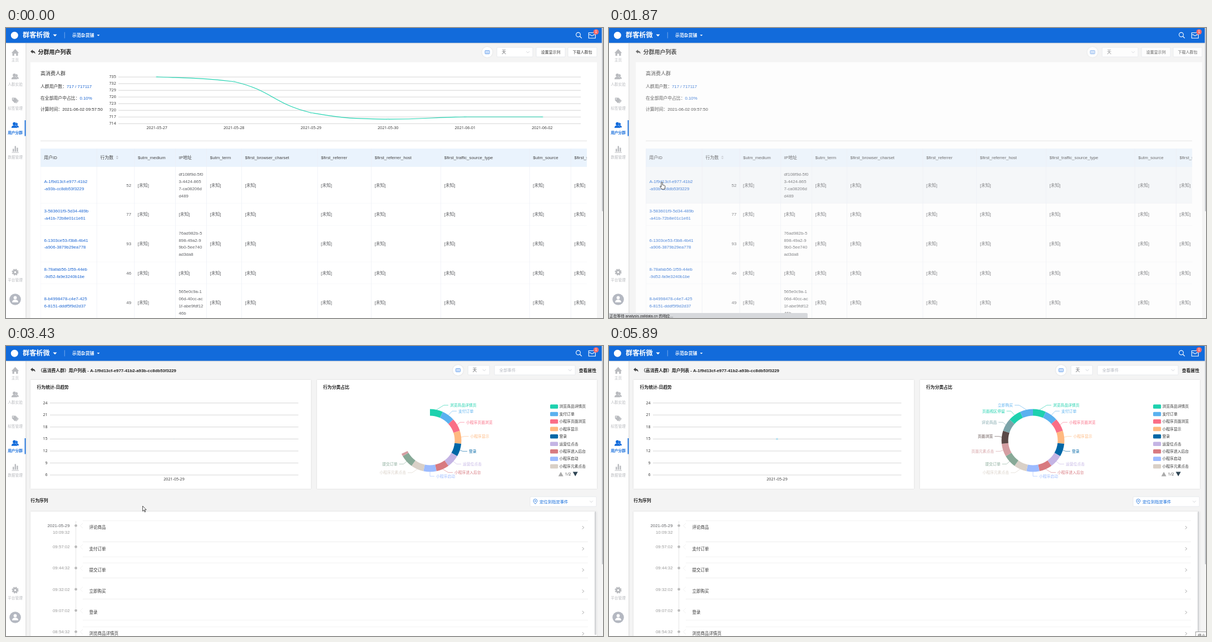
These frames come from a looping animation (1073x522 px, 5920 ms). An HTML page:

```html
<!DOCTYPE html>
<html lang="zh-CN">
<head>
<meta charset="utf-8">
<style>
html, body { margin: 0; width: 100%; height: 100%; overflow: hidden; background: #f4f4f4; }
svg { display: block; width: 100vw; height: 100vh; font-family: 'Liberation Sans', 'Noto Sans CJK SC', sans-serif; }
.axis { font-family: 'Open Sans', 'Noto Sans', sans-serif; }
.card { filter: drop-shadow(0 .8px .8px #0002); }
</style>
</head>
<body>
<script>
const LOOP = 5920, BLUE = '#126bdb', LINK = '#1c66d2', DARK = '#333', CELL = '#606266', GRAY = '#b9bbbf', EDGE = '#ebeef5';
const range = (n, f) => Array.from({ length: n }, (_, i) => f(i)).join('');

// y is the vertical middle of the text
const text = (x, y, s, str, fill = DARK, attrs = '') =>
  `<text x="${x}" y="${y + s * .36}" font-size="${s}" fill="${fill}" ${attrs}>${str}</text>`;
const rect = (x, y, w, h, fill, attrs = '') =>
  `<rect x="${x}" y="${y}" width="${w}" height="${h}" fill="${fill}" ${attrs}/>`;
const circle = (x, y, r, fill, attrs = '') => `<circle cx="${x}" cy="${y}" r="${r}" fill="${fill}" ${attrs}/>`;
const shape = (d, fill, attrs = '') => `<path d="${d}" fill="${fill}" ${attrs}/>`;
const line = (d, color, w = .6, attrs = '') => shape(d, 'none', `stroke="${color}" stroke-width="${w}" ${attrs}`);
const group = (id, body, attrs = '') => `<g id="${id}" ${attrs}>${body}</g>`;
const BOLD = 'font-weight="700"', MID = 'text-anchor="middle"', END = 'text-anchor="end"', AXIS = 'class="axis"';

const chevron = (x, y) => line(`M${x - 2.8} ${y - 1.3}l2.8 2.8 2.8-2.8`, '#b4b8c0');
const box = (x, y, w, h) => rect(x, y, w, h, '#fff', 'rx="1.5" stroke="#dcdfe6" stroke-width=".6"');
const back = shape('M44 42.3l4-3.4v2q4.6.3 4.6 5.6-1.5-2.7-4.6-2.6v2z', '#444');
const keyButton = x => circle(x, 43.5, 9.5, '#fff', 'class="card"') +
  rect(x - 4, 40.5, 8, 6, '#e3efff', 'rx=".8" stroke="#4c8fe6" stroke-width=".8"') +
  line(`M${x - 2.5} 42.7h5M${x - 2.5} 44.7h5`, '#4c8fe6', .7, 'stroke-dasharray="1 .8"');

// ---------- frame around the pages ----------
const users = (y, c) => shape(`M18 ${y - 4.5}a2.5 2.5 0 0 1 2 4.5q3 1 3 4h-3q0-3-3-4.3 2-2 1-4.2z`, c) +
  circle(15, y - 2.6, 2.9, c) + shape(`M9.8 ${y + 4.8}q0-4.6 5.2-4.6t5.2 4.6z`, c);
const caption = (y, s, on) => text(16.5, y, 6.7, s, on ? BLUE : GRAY, MID + (on ? ' ' + BOLD : ''));

const sidebar = rect(0, 27, 35.3, 495, '#fff', 'style="filter:drop-shadow(.8px 0 1px #0004)"') +
  shape('M9.8 45l6.7-7.2 6.7 7.2h-1.7v5h-3.3v-3.8h-3.4v3.8h-3.3v-5z', GRAY) + caption(57.5, '主页') +
  users(87.5, GRAY) + caption(101.5, '人群实验') +
  shape('M10.8 125.5h5l5 5.2-4.6 4.8-5.4-5.2zM17.2 125.5l5.6 5.4-4.2 4.8-1-.9 3.5-4-5.2-5.3z', GRAY) +
  circle(13, 127.7, .9, '#fff') + caption(145, '标签管理') +
  users(175, BLUE) + caption(189, '用户分群', true) + rect(33.6, 166, 1.8, 28.5, BLUE) +
  shape('M12 217.5h2.4v5H12zM15.6 212.5H18v10h-2.4zM19.2 215.5h2.4v7h-2.4zM10.5 223.5h12.5v1H10.5z', GRAY) + caption(233, '数据管理') +
  circle(16.5, 439.5, 3.3, 'none', `stroke="${GRAY}" stroke-width="3"`) +
  circle(16.5, 439.5, 5.2, 'none', `stroke="${GRAY}" stroke-width="1.8" stroke-dasharray="2.4 1.68"`) + caption(453.5, '平台管理') +
  circle(16.5, 488.5, 10.3, '#b4b8c1') + circle(16.5, 485.5, 2.9, '#fff') + shape('M11 493.8q0-4.8 5.5-4.8t5.5 4.8z', '#fff');

const header = rect(0, 0, 1073, 26.7, BLUE, 'style="filter:drop-shadow(0 .8px 1px #0004)"') +
  circle(15.3, 13.2, 6.5, '#fff') +
  text(30, 13, 12.2, '群客析微', '#fff', 'font-weight="900"') +
  shape('M84.5 11.5h7l-3.5 3.8z', '#fff') + line('M105.3 7.5v11', '#fff9', .7) +
  text(119, 13, 7.9, '示范杂货铺', '#fff', BOLD) + shape('M163.6 12h4.8l-2.4 2.6z', '#fff') +
  circle(1028.5, 12, 3.9, 'none', 'stroke="#fff" stroke-width="1.1"') + line('M1031.4 15l3.4 3.4', '#fff', 1.3) +
  line('M1047.3 8.5h12v9.7h-12zM1047.3 12h3.4q.5 2 2.6 2t2.6-2h3.4', '#fff', 1.1) +
  circle(1060.5, 7, 4.8, '#f56c6c') + text(1060.5, 7, 6.5, '1', '#fff', MID);

// ---------- page 1: user list ----------
const trend = [88, 96.5, 152.5, 164.2, 160, 160].map((y, i) => [271.2 + 138.5 * i, y]);
function smooth(p) {
  const at = i => p[Math.max(0, Math.min(p.length - 1, i))];
  const clamp = (v, a, b) => Math.max(Math.min(a, b), Math.min(Math.max(a, b), v));
  const handle = (i, dir) => {
    const v = [0, 1].map(k => at(i)[k] + dir * (at(i + 1)[k] - at(i - 1)[k]) / 4);
    return [v[0], clamp(v[1], at(i)[1], at(i + dir)[1])];
  };
  return 'M' + p[0] + range(p.length - 1, i => `C${handle(i, 1)} ${handle(i + 1, -1)} ${p[i + 1]}`);
}
const days = ['2021-05-27', '2021-05-28', '2021-05-29', '2021-05-30', '2021-06-01', '2021-06-02'];
const trendChart =
  range(8, i => line(`M202 ${88.2 + 12 * i}h831`, '#c9c9c9', .8) + text(197.8, 87.5 + 12 * i, 7.2, 735 - 3 * i, DARK, `${AXIS} ${END}`)) +
  days.map((d, i) => text(trend[i][0], 179.7, 7.2, d, DARK, `${AXIS} ${MID}`)).join('') +
  line(smooth(trend), '#22d3b1', 1.2) + trend.map(p => circle(...p, 1.1, '#fff', 'stroke="#22d3b1" stroke-width=".6"')).join('');

const cols = [62, 163.3, 230.8, 304.5, 360.5, 423.5, 560, 656.5, 781.5, 941, 1015.3];
const heads = ['用户ID', '行为数', '$utm_medium', 'IP地址', '$utm_term', '$first_browser_charset', '$first_referrer',
  '$first_referrer_host', '$first_traffic_source_type', '$utm_source', '$first_search'];
const unknown = ['[未知]'];
const rows = [
  [250, 66, 'A-1f9d13cf-e977-41b2 -a93b-cc8db53f3229', 52, 'df108f9d-5f0 3-4424-865 7-ca08206d d489'],
  [316, 39.6, '3-583601f9-5d34-489b -a41b-72b8e01c1e61', 77],
  [355.6, 65.7, '6-1303ce53-f3b8-4b41 -a906-3879b29ea778', 93, '76ad982b-5 898-49a2-9 9b0-5ee740 ad3da8'],
  [421.3, 39.7, '8-78afab56-1f59-44eb -9d52-fa9e3240b1be', 46],
  [461, 66, '8-b4998478-c4e7-425 6-8151-dddf5f9d2d37', 49, '565e0c9a-1 06d-40cc-ac 1f-abe9fdf12 46b']
];
const lines = (x, y, list, fill) =>
  list.map((s, i) => text(x, y + (i - (list.length - 1) / 2) * 12.9, 7.83, s, fill)).join('');
const row = ([y, h, id, n, ip], r) => {
  const m = y + h / 2 - .3;
  return rect(62, y, 982, h, '#fff', `id="row${r}"`) + lines(68.5, m, id.split(' '), LINK) +
    text(225, m, 7.83, n, CELL, END) +
    cols.slice(2).map((x, i) => lines(x + 6, m, i == 1 && ip ? ip.split(' ') : unknown, CELL)).join('') +
    line(`M62 ${y + h}h982`, EDGE, .7);
};
const table = rect(62, 217, 982, 33, '#eaf3fd') + rows.map(row).join('') +
  cols.map((x, i) => text(x + 6.3, 233, 7.83, heads[i], '#444') + line(`M${x} 217v305`, EDGE, .7)).join('') +
  shape('M197.5 232.2l2.3-2.4 2.3 2.4zM197.5 233.8l2.3 2.4 2.3-2.4z', '#c0c4cc');

const button = (x, s) => box(x, 35, 52, 17) + text(x + 26, 43.6, 7, s, DARK, MID);
const page1 = back + text(57.5, 43, 10, '分群用户列表', '#222', BOLD) +
  keyButton(865) + box(882.3, 35, 64.5, 17) + text(891, 43.5, 7.83, '天', CELL) + chevron(938, 43.3) +
  button(953, '设置显示列') + button(1010, '下载人群包') +
  rect(44, 61.5, 1018, 470, '#fff') + text(62, 81.5, 9, '高消费人群', DARK, 'font-weight="500"') +
  text(62, 105.5, 7.83, `人群用户数：<tspan fill="${LINK}">717 / 717117</tspan>`) +
  text(62, 126, 7.83, `在全部用户中占比：<tspan fill="${LINK}">0.10%</tspan>`) +
  text(62, 146, 7.83, '计算时间：2021-06-02 09:57:50') +
  group('trend', trendChart) + line('M62 203.2h982', '#ddd', .9) + group('table', table, 'clip-path="url(#tableClip)"');

// ---------- page 2: one user ----------
const TURN = Math.PI * 2;
// name, colour, label x, label y, in order around the ring
const parts = [
  ['浏览商品详情页', '#1dd1ae', 798, 106.5], ['支付订单', '#5ab1ef', 813, 117.2], ['小程序页面浏览', '#fa6e86', 827, 137.3],
  ['小程序显示', '#ffb980', 834.5, 162.7], ['登录', '#0067a6', 832, 189.5], ['运营位点击', '#c4b4e4', 821, 212.5],
  ['小程序进入后台', '#d87a80', 806, 227.7], ['小程序启动', '#9cbbff', 773, 234.4], ['小程序元素点击', '#d9d0c7', 719, 228],
  ['提交订单', '#87a997', 703.5, 212.5], ['页面元素点击', '#d49ea2', 692, 189.5], ['页面浏览', '#5b4947', 690, 162.7],
  ['评论商品', '#7ba3a8', 697, 137.3], ['页面视区停留', '#1dd1ae', 711.5, 117.2], ['立即购买', '#5ab1ef', 726, 106.5]
];
const STEP = TURN / parts.length;
const ring = (a, r) => [762 + r * Math.sin(a), 170 - r * Math.cos(a)];
const arc = (a, b) => b > a ? `M${ring(a, 50.5)}A50.5 50.5 0 0 1 ${ring(b, 50.5)}` : '';
const pieLabel = ([name, color, x, y], i) => {
  const dir = i < 8 ? 1 : -1;
  return group('label' + i, line(`M${ring((i + .5) * STEP, 56.5)}L${x - 11 * dir} ${y}H${x - 3 * dir}`, color, .6) +
    text(x, y, 6.8, name, color, dir < 0 ? END : ''));
};
const pie = parts.map((p, i) => line('', p[1], 12, `id="slice${i}"`) + pieLabel(p, i)).join('') +
  range(9, i => rect(978, 105.2 + 13.45 * i, 14.2, 7.6, parts[i][1], 'rx="1.5"') + text(994.5, 108.9 + 13.45 * i, 6.8, parts[i][0])) +
  shape('M992.7 234.5h9l-4.5-8z', '#aaa') + text(1010, 230.3, 7, '1/2', DARK, AXIS + ' ' + MID) + shape('M1018.7 226.5h9l-4.5 8z', '#2f4554');

const dayChart = range(7, i => line(`M79 ${102.6 + 21.6 * i}h446.5`, '#ccc', .8) +
  text(74.7, 102 + 21.6 * i, 7.2, 24 - 3 * i, DARK, `${AXIS} ${END}`)) +
  text(302, 239.2, 7.2, '2021-05-29', DARK, `${AXIS} ${MID}`) +
  circle(302, 167.4, 1.3, '#d9f3fb', 'id="dot" stroke="#7cc8e6" stroke-width=".7"');

const events = [['10:09:32', '评论商品'], ['09:57:02', '支付订单'], ['09:44:32', '提交订单'], ['09:32:02', '立即购买'],
  ['09:07:02', '登录'], ['08:54:32', '浏览商品详情页']];
const eventRow = ([time, name], i) => {
  const y = 323.3 + 38.2 * i;
  return group('', shape(`M138 ${y - 9}h908v26.7h-908v-13l-4.5-4.5 4.5-4.5z`, '#fff'), 'style="filter:drop-shadow(0 .7px .6px #0004)"') +
    circle(125.6, y, 2.4, '#bbb') + text(149.5, y + 3.4, 7.5, name) +
    line(`M1035.8 ${y + .7}l2.7 2.8-2.7 2.8`, '#888', .8) +
    (i ? '' : text(114.5, y, 7.83, '2021-05-29', CELL, END)) +
    text(114.5, y + (i ? -.2 : 12), 7.83, time, '#999', END);
};
const details = text(58, 43.7, 7.83, '（高消费人群）用户列表 - A-1f9d13cf-e977-41b2-a93b-cc8db53f3229', '#222', BOLD) +
  dayChart + pie + line('M125.6 315v207', '#ddd', .8) + events.map(eventRow).join('') + rect(1057.8, 298, 3.4, 222, '#d6d7d9', 'rx="1.5"');

const NONE = '当前筛选条件无数据...';
const robot = x => rect(x - 15, 159, 30, 19, '#eee', 'rx="3" stroke="#aaa" stroke-width=".8"') +
  line(`M${x - 18} 180h36M${x - 13} 158l4-5h14l6 6M${x + 11} 152l3-5M${x - 2} 172q2 2 4 0`, '#aaa', .8) +
  circle(x - 6, 168, 1.6, '#aaa') + circle(x + 6, 168, 1.6, '#aaa') + text(x, 195.5, 7.7, NONE, '#666', MID);
const empty = robot(296) + robot(810) +
  shape('M536 494a10 10 0 0 1-2-19 14 14 0 0 1 27-6 12 12 0 0 1 1 25z', '#58aed6') +
  text(548, 480, 22, '?', '#fff', MID) + text(546, 511, 7.7, NONE, '#666', MID);

const page2 = back + keyButton(812.5) + box(830.3, 35, 38.7, 17) + text(838.5, 43.5, 7.83, '天', CELL) + chevron(859.5, 43.3) +
  box(878, 35, 145, 17) + text(886.5, 43.7, 7.4, '全部事件', '#b4b8c0') + chevron(1013.7, 43.3) +
  text(1029.7, 43.7, 7.83, '查看属性', '#222', BOLD) +
  rect(44, 61, 504, 196, '#fff', 'class="card"') + rect(559, 61, 503, 196, '#fff', 'class="card"') +
  text(55.5, 74, 7.83, '行为统计-日趋势', '#222', BOLD) + text(570, 74, 7.83, '行为分类占比', '#222', BOLD) +
  text(44.3, 278.5, 7.83, '行为序列', '#222', BOLD) +
  box(942, 271.3, 119, 17.5) + shape('M951.3 284.3q-3.4-3.6-3.4-5.4a3.4 3.4 0 0 1 6.8 0q0 1.8-3.4 5.4z', 'none', `stroke="${BLUE}" stroke-width=".8"`) +
  circle(951.3, 279, 1, BLUE) + text(959, 280.3, 7.35, '定位到指定事件', BLUE) + chevron(1052, 280) +
  rect(44, 298, 1018, 230, '#fff', 'class="card"') + group('empty', empty) + group('details', details);

// ---------- overlays ----------
const INK = 'stroke="#000" stroke-width=".7" stroke-linejoin="round"';
const cursors = group('arrow', shape('M0 0v9.3l2.2-2 1.5 3.6 1.4-.6-1.5-3.5h3z', '#fff', INK)) +
  group('hand', shape('M0 .9a1.1 1.1 0 0 1 2.2 0v4l3.4.8q1.5.4 1.3 2.2l-.8 4.6h-5.3l-2.9-4.4q-.6-1.2.8-1.2l1.3 1.3z', '#fff', INK));
const status = rect(-2, 513, 359, 12, '#d7d9dc', 'rx="2"') + text(1, 519, 6.7, '正在等待 analysis.zalldata.cn 的响应...', '#222');
const tip = rect(1054.5, 514.5, 24, 12, '#fff', 'stroke="#888" stroke-width=".8"') + text(1058, 521.5, 7, '停止', '#444');

document.body.innerHTML = `<svg viewBox="0 0 1073 522"><clipPath id="tableClip"><rect x="62" y="210" width="982" height="320"/></clipPath>` +
  rect(0, 0, 1073, 522, '#f4f4f4') + group('page1', page1) + group('page2', page2) + sidebar + header +
  rect(1070.8, 0, 2.2, 522, '#f7f7f7') + rect(1071.2, 0, 1.8, 330, '#bfc1c6', 'id="thumb" rx=".9"') +
  group('status', status) + group('tip', tip) + cursors + '</svg>';

// ---------- motion ----------
const $ = id => document.getElementById(id);
const unit = v => Math.max(0, Math.min(1, v));
const show = (id, on) => $(id).setAttribute('visibility', on ? 'visible' : 'hidden');

// the standard CSS "ease" curve
function ease(x) {
  let lo = 0, hi = 1, s = .5;
  for (let i = 0; i < 20; i++) {
    s = (lo + hi) / 2;
    if (.75 * s * (1 - s) + s ** 3 < x) lo = s; else hi = s;
  }
  return .3 * s * (1 - s) ** 2 + 3 * s * s * (1 - s) + s ** 3;
}

// time, x, y
const path = [[390, 1064, 518], [480, 940, 455], [600, 560, 345], [720, 230, 290], [840, 72, 262], [960, 88, 268], [1090, 88, 268],
  [1250, 94, 278], [2880, 94, 277], [3080, 170, 280], [3310, 245, 288], [3500, 246, 288], [3950, 310, 283], [4300, 480, 282],
  [4540, 719, 280], [4790, 928, 303], [4950, 1000, 400], [5170, 1037, 499], [5380, 1056, 523]];
function cursorAt(t) {
  const i = path.findIndex(p => p[0] > t);
  if (i < 1) return null;
  const [a, b] = [path[i - 1], path[i]], k = (t - a[0]) / (b[0] - a[0]);
  return [a[1] + (b[1] - a[1]) * k, a[2] + (b[2] - a[2]) * k];
}

const LEAVE = 1783, ENTER = 2369, READY = 3100, SLIDE = 16.8;
function place(id, x, opacity) {
  $(id).setAttribute('transform', `translate(${x} 0)`);
  $(id).setAttribute('opacity', opacity);
}

function draw(t) {
  const out = ease(unit((t - LEAVE) / 500)), enter = ease(unit((t - ENTER) / 500));
  place('page1', SLIDE * out, t < LEAVE + 500 ? 1 - out : 0);
  place('page2', SLIDE * (enter - 1), t < ENTER ? 0 : enter);
  show('trend', t < LEAVE);
  show('empty', t < READY);
  show('details', t >= READY);
  $('thumb').setAttribute('height', t < ENTER ? 330 : 393);

  const grow = 1 - (1 - unit((t - READY - 15) / 1000)) ** 3, sweep = grow * TURN;
  parts.forEach((_, i) => {
    $('slice' + i).setAttribute('d', arc(i * STEP, Math.min(sweep, (i + 1) * STEP)));
    show('label' + i, t >= READY && sweep >= (i + .5) * STEP);
  });
  const dot = unit((t - 3380) / 700);
  $('dot').setAttribute('r', .2 + 1.1 * dot);
  $('dot').setAttribute('stroke-width', .2 + .5 * dot);

  const pos = cursorAt(t), hand = t >= 1180 && t < LEAVE + 500;
  show('hand', pos && hand);
  show('arrow', pos && !hand);
  if (pos) $(hand ? 'hand' : 'arrow').setAttribute('transform', `translate(${pos})`);
  rows.forEach(([y, h], i) => {
    const over = pos && pos[0] > 62 && pos[0] < 1044 && pos[1] >= y && pos[1] < y + h;
    $('row' + i).setAttribute('fill', over ? '#f5f7fa' : '#fff');
  });

  $('status').setAttribute('opacity', unit((t - 1510) / 150) * unit((2350 - t) / 150));
  show('tip', t >= 5860);
}

function tick() {
  draw(performance.now() % LOOP);
  requestAnimationFrame(tick);
}
tick();
</script>
</body>
</html>
```
